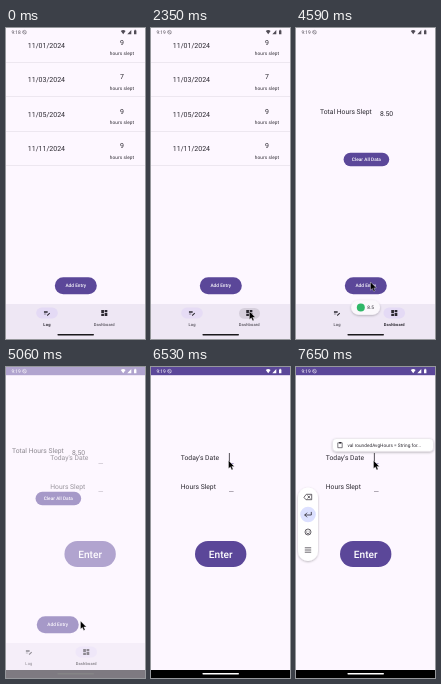
An HTML page for the animation above (8 s loop, 139 px wide and 311 px high).

```html
<!DOCTYPE html>
<html lang="en">
<head>
<meta charset="utf-8">
<title>Sleep log</title>
<style>
html, body { margin: 0; width: 100%; height: 100%; overflow: hidden; background: #fdf7ff; }
svg { display: block; width: 100%; height: 100%; }
text { font-family: Roboto, "Open Sans", sans-serif; text-rendering: geometricPrecision; white-space: pre; }
</style>
</head>
<body>
<svg id="stage" viewBox="0 0 139 311"></svg>
<script>
const LOOP = 8000, FPS = 17;
const INK = '#2b2830', PAPER = '#fdf7ff', PURPLE = '#5b4799', PILL = '#e4daf5';

const rect = (x, y, w, h, fill, r = 0, extra = '') =>
  `<rect x="${x}" y="${y}" width="${w}" height="${h}" rx="${r}" fill="${fill}" ${extra}/>`;
const text = (x, cy, size, str, { fill = INK, anchor = 'start', weight = 400, spacing = 0, id = '' } = {}) =>
  `<text ${id && `id="${id}"`} x="${x}" y="${cy + size * 0.36}" font-size="${size}" fill="${fill}"
    text-anchor="${anchor}" font-weight="${weight}" letter-spacing="${spacing}">${str}</text>`;
const group = (id, body, extra = '') => `<g id="${id}" ${extra}>${body}</g>`;
const line = (d, width = 0.7, stroke = INK) =>
  `<path d="${d}" fill="none" stroke="${stroke}" stroke-width="${width}" stroke-linecap="round" stroke-linejoin="round"/>`;
const button = (x, y, w, h, size, label) =>
  rect(x, y, w, h, PURPLE, h / 2) +
  text(x + w / 2, y + h / 2, size, label, { fill: '#fff', anchor: 'middle', weight: 500, spacing: 0.03 });
const icon = (cx, cy, d) =>
  `<path transform="translate(${cx - 4.06} ${cy - 4.06}) scale(.338)" d="${d}" fill="${INK}"/>`;

const row = ([date, hours], i) => {
  const y = i * 34.5;
  return text(21.8, y + 17.2, 7, date) +
    text(116, y + 14.4, 7, hours, { anchor: 'middle' }) +
    text(116, y + 25.4, 4.73, 'hours slept', { anchor: 'middle', spacing: 0.09 }) +
    rect(0, y + 34, 139, 0.5, '#ddd6e0');
};

const navItem = (name, cx, label, path) =>
  rect(cx - 10.8, 279.6, 21.6, 10.8, PILL, 5.4, `id="${name}Pill"`) +
  (name === 'dash' ? rect(88, 280, 21, 10.8, '#463f4d', 5.4, 'id="ripple"') : '') +
  icon(cx, 285, path) +
  text(cx, 296.3, 4.06, label, { anchor: 'middle', spacing: 0.16, id: name + 'Label' });

const logScreen = [['11/01/2024', 9], ['11/03/2024', 7], ['11/05/2024', 9], ['11/11/2024', 9]].map(row).join('');
const dashScreen =
  text(24, 83.7, 6.76, 'Total Hours Slept') +
  text(84, 85.2, 6.76, '8.50') +
  button(47.6, 124.7, 45.6, 13.6, 4.73, 'Clear All Data');

const nav =
  navItem('log', 41, 'Log', 'M3 10h11v2H3zM3 6h11v2H3zM3 14h7v2H3zM12 18l7-7 2.2 2.2L14.2 20H12z') +
  navItem('dash', 98.3, 'Dashboard', 'M3 13h8V3H3zM3 21h8v-6H3zM13 21h8V11h-8zM13 3v6h8V3z');

const form =
  text(29.8, 90.9, 6.76, "Today's Date") +
  text(29.8, 119.1, 6.76, 'Hours Slept') +
  rect(78, 96, 4.6, 0.5, '#625b68', 0, 'id="field"') +
  rect(78, 124, 4.6, 0.5, '#625b68') +
  rect(77.9, 86, 0.8, 10, INK, 0, 'id="caret"') +
  button(44, 174, 51.4, 26, 10.15, 'Enter');

const toolbar =
  rect(2, 120.5, 20, 73.5, '#fff', 10, 'filter="url(#shadow)"') +
  line('M8.2 130L10.3 127.3H15.7V132.7H10.3ZM11.8 128.8L14 131.2M14 128.8L11.8 131.2') +
  '<circle cx="12" cy="147.5" r="7.8" fill="#dce0ff"/>' +
  line('M15.3 145.3V148H8.8M10.8 146L8.8 148L10.8 150', 0.8) +
  '<circle cx="12" cy="165" r="3" fill="none" stroke="#2b2830" stroke-width=".7"/>' +
  line('M10.8 164V164.2M13.2 164V164.2M10.5 166Q12 167.8 13.5 166') +
  line('M9.2 180.8H14.8M9.2 183H14.8M9.2 185.2H14.8');

const clipboard =
  rect(36.5, 71.6, 101, 12.8, '#fff', 3.8, 'stroke="#d5cfd8" stroke-width=".4" filter="url(#shadow)"') +
  line('M42.2 75.8H46.2V80.7H42.2Z', 0.6) + rect(43.1, 75, 2.2, 1.4, INK, 0.3) +
  text(51.5, 78, 4.73, 'val roundedAvgHours = String.for...', { spacing: 0.02 });

const status =
  text(5.4, 4.2, 4.9, '9:18', { fill: 'currentColor', id: 'clock' }) +
  line('M16.7 4.2a1.8 1.8 0 1 0 3.6 0a1.8 1.8 0 1 0 -3.6 0M17.3 2.9L19.7 5.5', 0.5, 'currentColor') +
  '<path d="M114.8 3Q117.2 1.2 119.6 3L117.2 6.2ZM121.3 6.2L125.3 2V6.2ZM128 2.4H128.7V1.8H129.7V2.4H130.4V6.3H128Z" fill="currentColor"/>';

document.getElementById('stage').innerHTML =
  `<defs><filter id="shadow" x="-30%" y="-30%" width="160%" height="160%">
    <feDropShadow dx="0" dy=".9" stdDeviation="1.2" flood-color="#000" flood-opacity=".28"/></filter></defs>` +
  rect(0, 0, 139, 311, PAPER) +
  rect(0, 276, 139, 35, '#eee7f4') +
  rect(51.4, 306, 36.6, 1.5, '#1b191d', 0.75) +
  group('home', group('log', logScreen) + group('dash', dashScreen) + nav +
    button(48.8, 249.3, 42, 16.9, 4.73, 'Add Entry') +
    rect(48.8, 249.3, 42, 16.9, '#fff', 8.45, 'id="press"')) +
  group('toast',
    rect(55.2, 272.3, 28.8, 14.4, '#fbf8fc', 7.2, 'filter="url(#shadow)"') +
    '<circle cx="64.8" cy="279.5" r="4" fill="#30b868"/>' +
    text(71.3, 279.6, 4.73, '8.5')) +
  group('entry',
    rect(0, 0, 139, 311, PAPER) + rect(0, 0, 139, 8.2, PURPLE) +
    rect(0, 303, 139, 8, '#000') + rect(51.4, 306, 36.6, 1.5, '#fff', 0.75) +
    group('form', form)) +
  group('toolbar', toolbar) + group('clipboard', clipboard) + group('status', status) +
  group('cursor', '<path d="M0 0V8.1L1.9 6.4L3.2 9.4L4.6 8.8L3.3 5.9H5.9Z" fill="#000" stroke="#fff" stroke-width=".35"/>');

const el = Object.fromEntries([...document.querySelectorAll('[id]')].map(e => [e.id, e]));
const show = (name, alpha) => el[name].setAttribute('opacity', alpha);
const move = (name, transform) => el[name].setAttribute('transform', transform);
const ramp = (t, from, to) => Math.min(1, Math.max(0, (t - from) / (to - from)));
const smooth = u => u * u * (3 - 2 * u);
const scaleAbout = (cx, cy, sx, sy) => `translate(${cx} ${cy}) scale(${sx} ${sy}) translate(${-cx} ${-cy})`;
// Quick start, long settling tail.
const emphasized = u => u < 1 / 6 ? 0.4 * (u * 6) ** 3 : 1 - 0.6 * (1 - (u - 1 / 6) * 1.2) ** 8;

// Pointer stops: tick, x, y
const pointer = [
  [6, 8, 298], [7, 56, 289], [9, 56, 289], [11, 73, 286], [13, 41, 298], [17, 41, 298],
  [20, 39, 298], [31, 98, 284], [34, 98.5, 283.5], [57, 98, 283], [61, 97, 266.2],
  [63, 97, 266.2], [66, 72, 127], [70, 61, 252], [73, 61, 252], [78, 74.5, 254],
  [91, 74.5, 254], [94, 66, 235], [95, 61, 185], [96, 67.5, 130], [98, 67.5, 130], [110, 77.5, 93.5]
];
function pointerAt(tick) {
  const next = pointer.findIndex(p => p[0] > tick);
  if (next < 0) return pointer.at(-1).slice(1);
  const [k0, x0, y0] = pointer[Math.max(0, next - 1)], [k1, x1, y1] = pointer[next];
  const u = smooth(ramp(tick, k0, k1));
  return [x0 + (x1 - x0) * u, y0 + (y1 - y0) * u];
}

function render(ms) {
  const tick = Math.floor((ms + 5) * FPS / 1000), t = tick * 1000 / FPS;

  const swap = smooth(ramp(t, 2353, 2650));
  show('log', 1 - swap);
  show('dash', swap);
  show('logPill', tick < 40 ? 1 : 0.8 * (1 - swap));
  show('dashPill', swap);
  move('dashPill', scaleAbout(98.3, 285, 0.4 + 0.6 * swap, 1));
  el.logLabel.setAttribute('font-weight', tick < 40 ? 700 : 400);
  el.dashLabel.setAttribute('font-weight', swap > 0.3 ? 700 : 400);
  show('ripple', 0.14 * ramp(t, 2120, 2300) * (1 - ramp(t, 2400, 2750)));

  const toast = smooth(ramp(t, 2700, 3150));
  show('toast', toast * (1 - ramp(t, 4760, 4960)));
  move('toast', scaleAbout(69.6, 279.5, 0.8 + 0.2 * toast, 0.8 + 0.2 * toast));

  show('press', 0.14 * ramp(t, 4700, 4880) * (1 - ramp(t, 4900, 5050)));
  const slide = emphasized(ramp(t, 4970, 5420)), alpha = ramp(t, 5020, 5103);
  move('home', `translate(${-32.5 * slide})`);
  move('form', `translate(${32.5 * (1 - slide)})`);
  show('entry', alpha);

  const focused = tick >= 111;
  show('caret', focused && (tick < 120 || tick >= 129) ? 1 : 0);
  el.field.setAttribute('fill', focused ? PURPLE : '#625b68');
  const popup = smooth(ramp(t, 7294, 7600));
  show('toolbar', popup);
  show('clipboard', popup);

  el.clock.textContent = tick < 32 ? '9:18' : '9:19';
  el.status.setAttribute('color', alpha > 0.3 ? '#fff' : '#514c56');

  show('cursor', tick < 6 ? 0 : 1);
  move('cursor', `translate(${pointerAt(tick)})`);
}

const start = performance.now();
function loop() {
  render((performance.now() - start) % LOOP);
  requestAnimationFrame(loop);
}
loop();
</script>
</body>
</html>
```
